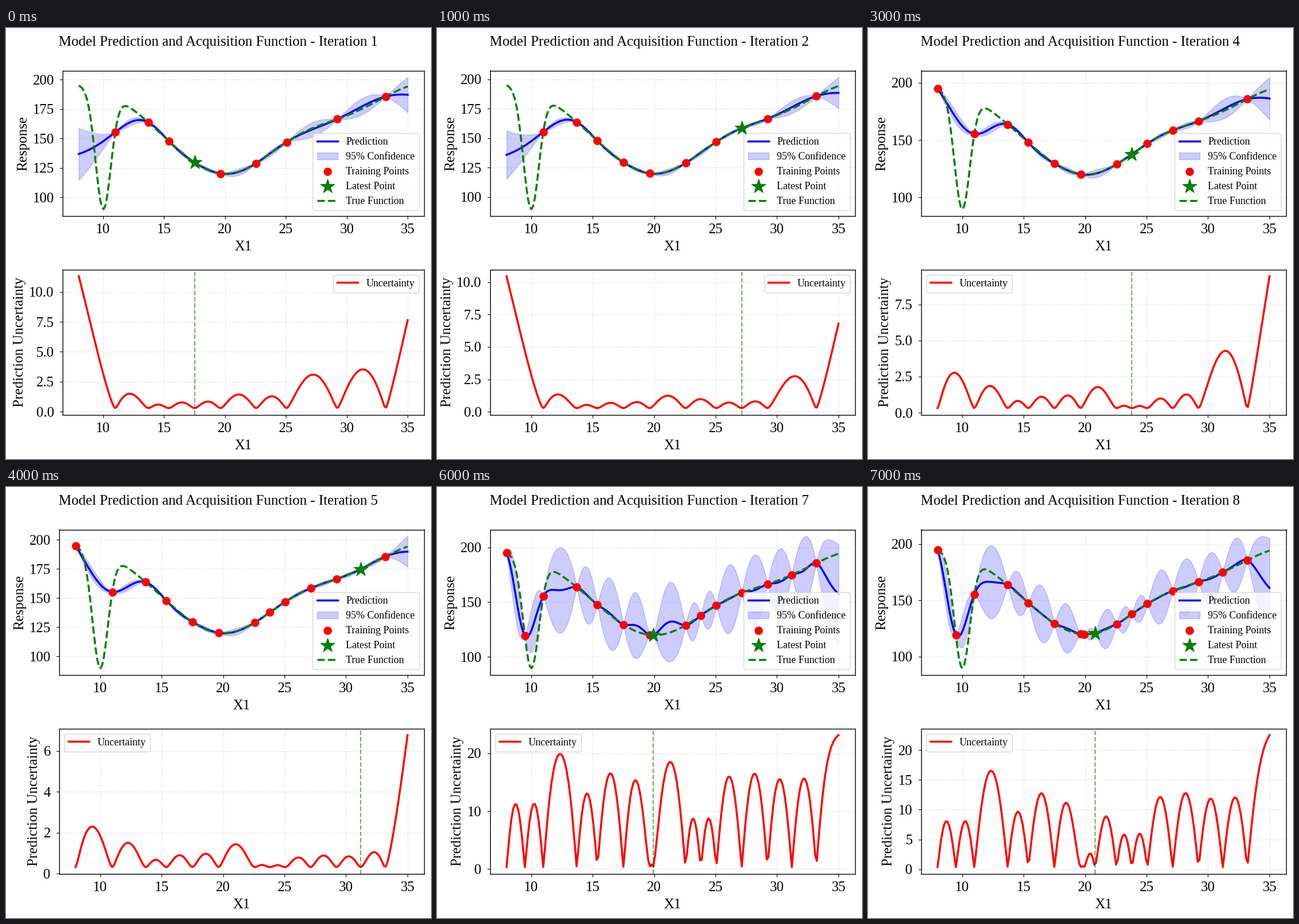
These frames come from a looping animation (743 px wide and 754 px high, 8 s). A matplotlib script:

```python
import numpy as np
import matplotlib.pyplot as plt
from matplotlib.animation import FuncAnimation

W, H, DPI = 743, 754, 100

plt.rcParams.update({
    "font.family": "Liberation Serif",
    "font.size": 18,
    "xtick.major.pad": 6,
    "ytick.major.pad": 7,
    "axes.linewidth": 1.0,
    "legend.fontsize": 13,
})


def matern(a, b, scale):
    r = np.sqrt(5) * np.abs(a[:, None] - b[None, :]) / scale
    return (1 + r + r**2 / 3) * np.exp(-r)


def gp_predict(x, y, grid, scale, noise):
    """Mean and deviation of a Gaussian process fitted to normalised y."""
    mu, sd = y.mean(), y.std()
    amp = 1 + scale**2 / 40  # smoother fits carry a larger prior variance
    cov = amp * matern(x, x, scale) + noise * np.eye(len(x))
    cross = amp * matern(grid, x, scale)
    mean = cross @ np.linalg.solve(cov, (y - mu) / sd)
    var = amp + noise - np.sum(cross * np.linalg.solve(cov, cross.T).T, axis=1)
    return mu + sd * mean, sd * np.sqrt(np.maximum(var, 0))


# Evenly spaced key heights of the smooth part of the response
KEY_Y = np.array([195.6, 184.6, 161, 133.4, 119.9, 131.9, 152.9, 165.6, 179.1, 194.2])
KEY_X = np.linspace(8, 35, len(KEY_Y))


def true_response(x):
    """Smooth valley with a sharp dip at x = 10."""
    base, _ = gp_predict(KEY_X, KEY_Y, x, 8, 1e-6)
    return base - 100 * np.exp(-(x - 10) ** 2 / 0.8)


START_X = [10.99, 13.71, 15.385, 19.635, 22.56, 25.057, 29.225, 33.187]
NEXT_X = [17.505, 27.12, 8, 23.805, 31.2, 9.4925, 19.92, 20.81]
SCALES = [6.5, 6.8, 5.05, 5.5, 6.2, 0.28, 1.09, 1.4]
NOISE = 1.1e-4
HIGH_NOISE = {2: 1e-3, 5: 1.8e-3}  # iterations whose fit found more noise

GRID = np.linspace(8, 35, 200)
TRUTH = true_response(GRID)

fig = plt.figure(figsize=(W / DPI, H / DPI), dpi=DPI, facecolor="white")
top, bottom = fig.add_axes([0, 0.5, 1, 0.4]), fig.add_axes([0, 0, 1, 0.4])
title = fig.text(0.5, 1 - 31 / H, "", ha="center", va="baseline")


def reset(ax, left, upper, ylabel):
    ax.clear()
    ax.set_position([left / W, 1 - (upper + 254) / H, (731 - left) / W, 254 / H])
    ax.set_xlabel("X1", labelpad=6)
    ax.set_ylabel(ylabel)
    ax.grid(True, linestyle="--", alpha=0.3)


def draw(i):
    old = np.array(START_X + NEXT_X[:i])
    latest = NEXT_X[i]
    x = np.append(old, latest)
    y = true_response(x)
    mean, dev = gp_predict(x, y, GRID, SCALES[i], HIGH_NOISE.get(i, NOISE))

    title.set_text(f"Model Prediction and Acquisition Function - Iteration {i + 1}")
    left = 98.5 if i == 0 else 92.5  # decimal tick labels need more room

    reset(top, left, 74.5, "Response")
    top.plot(GRID, mean, "b-", lw=2.5, label="Prediction")
    top.fill_between(GRID, mean - 1.96 * dev, mean + 1.96 * dev, color="blue",
                     alpha=0.2, label="95% Confidence")
    top.scatter(old, y[:-1], c="red", s=90, zorder=5, label="Training Points")
    top.scatter(latest, y[-1], c="green", s=330, marker="*", zorder=6,
                label="Latest Point")
    top.plot(GRID, TRUTH, "g--", lw=2.5, label="True Function")
    top.legend(loc="lower right")

    reset(bottom, left, 422.5, "Prediction Uncertainty")
    bottom.plot(GRID, dev, "r-", lw=2.5, label="Uncertainty")
    bottom.axvline(latest, color="green", linestyle="--", lw=1.5, alpha=0.6)
    bottom.legend(loc="best")
    return []


anim = FuncAnimation(fig, draw, frames=len(NEXT_X), interval=1000, repeat=True)
plt.show()
```
